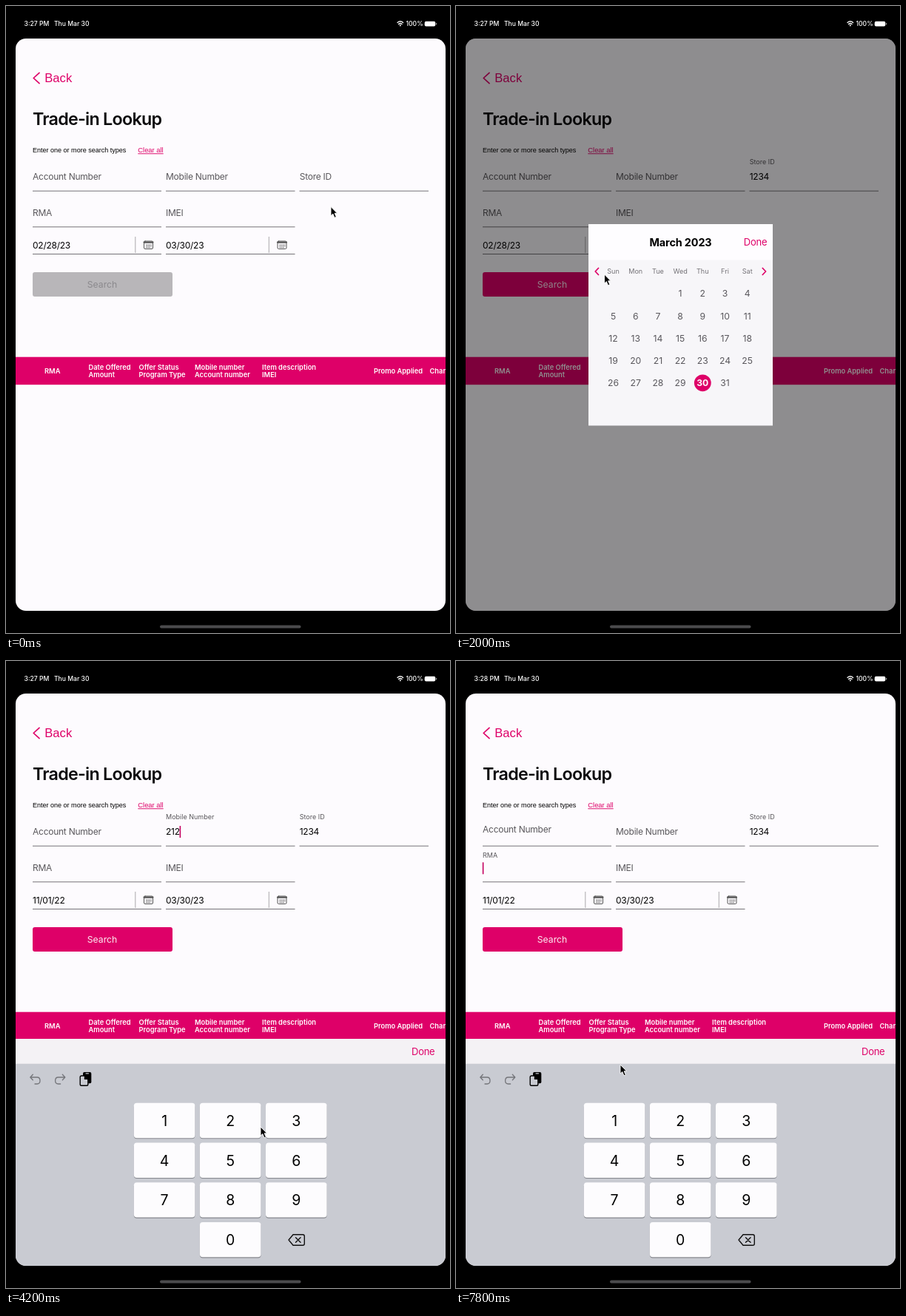
These frames come from a looping animation (600x848 px, 8000 ms). An HTML page:

```html
<!DOCTYPE html>
<html lang="en">
<head>
<meta charset="utf-8">
<title>Trade-in Lookup</title>
<style>
  html, body { margin: 0; width: 100%; height: 100%; overflow: hidden; background: #000; }
  svg { display: block; width: 100vw; height: 100vh; }
  text { font: 12px Inter, Roboto, sans-serif; font-optical-sizing: none; white-space: pre; }
  .arial { font-family: "Liberation Sans", sans-serif; }
  .mid { text-anchor: middle; }
  .pink { fill: #de0068; }
  .field { letter-spacing: -.25px; }
  .done { font-size: 13px; letter-spacing: -.25px; }
  .status text { font-size: 8.6px; font-weight: 500; fill: #fff; }
  .head text { font-size: 9.3px; font-weight: 600; fill: #fff; }
  .line { fill: none; stroke-linecap: round; stroke-linejoin: round; }
</style>
</head>
<body>
<svg viewBox="0 0 600 848" xmlns="http://www.w3.org/2000/svg">
  <defs>
    <clipPath id="panel"><rect x="13" y="44" width="581" height="774" rx="14"/></clipPath>
    <filter id="soft" x="-10%" y="-50%" width="120%" height="200%">
      <feDropShadow dx="0" dy="2" stdDeviation="5" flood-opacity=".22"/>
    </filter>
    <g id="calIcon" class="line" stroke="#555">
      <rect x="-6" y="-5" width="12" height="10.5" rx="1.5"/>
      <path d="M-6-3.4H6" stroke-width="2.2"/>
      <path d="M-3 0H4M-3 1.8H4M-3 3.6H2" stroke-width=".9" stroke-dasharray=".7 1.5"/>
    </g>
  </defs>

  <rect width="600" height="848"/>
  <g class="status">
    <text id="clock" x="24.5" y="27"></text>
    <text x="65" y="27">Thu Mar 30</text>
    <text x="540.5" y="27">100%</text>
    <g class="line" stroke="#fff" stroke-width="1.4">
      <path d="M529 22.4Q532.8 19 536.6 22.4M530.6 24.5Q532.8 22.5 535 24.5"/>
      <circle cx="532.8" cy="26.3" r=".4"/>
    </g>
    <rect x="565.7" y="20.8" width="14.6" height="6.6" rx="2" fill="#fff"/>
    <rect x="581" y="22.8" width="1.2" height="2.6" rx=".6" fill="#999"/>
  </g>
  <rect x="208" y="837.5" width="190.5" height="4" rx="2" fill="#4b4b4d"/>

  <g clip-path="url(#panel)">
    <rect x="13" y="44" width="581" height="774" fill="#fdfbfe"/>
    <path class="line" d="M45 90.3L37.2 97.5L45 104.7" stroke="#de0068" stroke-width="1.7"/>
    <text class="arial pink" x="52.3" y="103" style="font-size:16.6px">Back</text>
    <text x="36" y="161" style="font-size:23.3px;font-weight:600;letter-spacing:-.75px" fill="#0b0a0c">Trade-in Lookup</text>
    <text class="arial" x="36" y="198.3" style="font-size:9.03px">Enter one or more search types</text>
    <text class="arial pink" x="178.3" y="198.3" style="font-size:9.4px;text-decoration:underline">Clear all</text>

    <path d="M36 250.2H210M216 250.2H390.5M396.5 250.2H571M36 298.8H210M216 298.8H390.5M36 335.5H210M216 335.5H390.5" stroke="#757377"/>
    <path d="M174.8 312V334M355.3 312V334" stroke="#aaa8ac"/>
    <use href="#calIcon" x="192.5" y="323"/>
    <use href="#calIcon" x="373" y="323"/>
    <g id="fields"></g>
    <text id="from" class="field" x="36" y="327.6"></text>
    <text class="field" x="216" y="327.6">03/30/23</text>
    <rect id="caret" width="1.6" height="16" fill="#c4005f"/>

    <rect id="button" x="36" y="360" width="189" height="33" rx="3"/>
    <text id="buttonText" class="mid" x="130" y="381" style="font-size:12.2px">Search</text>

    <rect class="pink" x="13" y="474.7" width="581" height="37.5"/>
    <g class="head" id="head"></g>

    <g id="bar">
      <rect x="13" y="732.5" width="581" height="86" fill="#f3f2f5"/>
      <path d="M13 732.5H594" stroke="#cfced2"/>
      <text class="done pink" x="548" y="754">Done</text>
      <rect x="117" y="766" width="373" height="36" rx="8" fill="#f1f0f3" filter="url(#soft)"/>
      <rect x="162" y="768" width="283" height="32" rx="7" fill="#dddce0"/>
      <path d="M255.5 778V790M350.5 778V790" stroke="#a5a4a8"/>
      <text id="guess" class="mid" x="209" y="788.3" style="font-size:12.6px"></text>
      <g class="line" stroke="#333" stroke-width="1.1">
        <rect x="133.3" y="779" width="17" height="9.5" rx="1.8"/>
        <path d="M136 781.7H148M136 784H148" stroke-dasharray=".8 1.8"/>
        <path d="M138 786.3H145"/>
        <rect x="463.7" y="777" width="4.8" height="9" rx="2.4"/>
        <path d="M461.3 783.5Q461.3 788.3 466.1 788.3T470.9 783.5M466.1 788.5V791M463.7 791.2H468.5"/>
      </g>
      <circle cx="150.2" cy="786.8" r="3.7" fill="#222"/>
      <path class="line" d="M148.5 786.8H152" stroke="#fff" stroke-dasharray=".1 1.6"/>
    </g>

    <g id="pad">
      <rect x="13" y="511" width="581" height="34" fill="#f4f2f5"/>
      <text class="done pink" x="548" y="532.6">Done</text>
      <rect x="13" y="544.7" width="581" height="274" fill="#c9cbd2"/>
      <g class="line" stroke="#74757a" stroke-width="1.3">
        <path id="undo" d="M36.3 559.3L32.8 563L36.3 566.7M33 563H42Q46 563 46 567.5T42 572H39"/>
        <use href="#undo" transform="matrix(-1 0 0 1 112.6 0)"/>
      </g>
      <rect x="104" y="556" width="11.3" height="15.2" rx="2"/>
      <rect x="107.5" y="557.2" width="4.5" height="1.3" rx=".6" fill="#c9cbd2"/>
      <path d="M102 561H106.5L110.8 565.3V572.5Q110.8 574.3 109 574.3H102Q100.2 574.3 100.2 572.5V562.8Q100.2 561 102 561ZM106.5 561V565.3H110.8" fill="#c9cbd2" stroke="#000" stroke-width="1.4"/>
      <g id="keys"></g>
      <path class="line" d="M388 775.8H401Q403.3 775.8 403.3 778V788Q403.3 790.2 401 790.2H388L382 783ZM391.5 779.8L398 786.3M398 779.8L391.5 786.3" stroke="#111" stroke-width="1.4"/>
    </g>

    <g id="picker">
      <rect x="13" y="44" width="581" height="774" opacity=".44"/>
      <rect x="179" y="295" width="249" height="272.5" fill="#f7f6f9"/>
      <rect x="179" y="295" width="249" height="48.5" fill="#fefdff"/>
      <text id="month" class="mid" x="303.5" y="325" style="font-size:14.4px;font-weight:700;letter-spacing:-.12px"></text>
      <text class="done pink" x="388.8" y="324">Done</text>
      <path class="line" d="M192.5 354.5L188.2 359L192.5 363.5M414.3 354.5L418.6 359L414.3 363.5" stroke="#de0068" stroke-width="1.7"/>
      <g id="days"></g>
    </g>
  </g>
  <path id="cursor" d="M0 0V12.2L2.8 9.6L5 14.8L7.3 13.8L5.1 8.8H8.6Z" stroke="#fff" stroke-width=".9" stroke-linejoin="round"/>
</svg>

<script>
const STEP = 200, STEPS = 40;
const $ = id => document.getElementById(id);
const label = (x, y, s, attrs = '') => `<text x="${x}" y="${y}" ${attrs}>${s}</text>`;
const show = (id, on) => $(id).style.display = on ? '' : 'none';

// A track is a list of [step, value]; each value holds until the next one.
const at = (track, i) => track.reduce((v, [s, next]) => s <= i ? next : v, track[0][1]);

// Label poses: [font size, lift]
const LOW = [12, 0], HIGH = [9, -21.2], HIGH2 = [9, -18];
const fields = [
  { name: 'Account Number', x: 36, y: 235,
    pose: [[0, LOW], [32, [9, -4.4]], [33, HIGH], [38, [12, -3.5]]],
    text: [[0, ''], [34, '1'], [35, '12'], [36, '1'], [37, '']] },
  { name: 'Mobile Number', x: 216, y: 235,
    pose: [[0, LOW], [19, HIGH], [31, LOW]],
    text: [[0, ''], [20, '2'], [21, '212'], [22, '2125'], [23, '21255'], [24, '212555'],
      [25, '21255'], [26, '212'], [27, '2'], [28, '']] },
  { name: 'Store ID', x: 396.7, y: 235,
    pose: [[0, LOW], [2, HIGH]],
    text: [[0, ''], [3, '1'], [4, '12'], [5, '123'], [6, '1234']] },
  { name: 'RMA', x: 36, y: 284.3, pose: [[0, LOW], [38, HIGH2]], text: [[0, '']] },
  { name: 'IMEI', x: 216, y: 284.3,
    pose: [[0, LOW], [31, HIGH2], [32, [12, -17]], [33, LOW]], text: [[0, '']] }
];
const focus = [[0, -1], [2, 2], [8, -1], [19, 1], [31, 4], [32, 0], [38, 3]];
const monthsBack = [[0, 0], [11, 1], [12, 2], [13, 3], [14, 4]];

const path = [[0, 439, 271.5], [2, 430, 236], [5, 430, 236], [8, 181, 321.5], [9, 192, 324],
  [10, 200.5, 363], [11, 190, 359], [14, 190, 359], [15, 273, 388], [16, 404, 320],
  [17, 436.5, 347], [19, 262, 236], [20, 303, 622], [21, 344, 630], [22, 303, 676],
  [24, 303, 676], [25, 391, 783], [28, 391, 783], [30, 262, 290], [31, 250, 284],
  [32, 138, 236], [33, 132, 236], [34, 213, 622], [35, 302, 622], [36, 391, 780],
  [37, 391, 780], [38, 140, 282], [39, 222, 546]];

function cursorAt(i) {
  const n = path.findIndex(p => p[0] >= i);
  const [s1, x1, y1] = path[n], [s0, x0, y0] = path[Math.max(0, n - 1)];
  const k = s1 > s0 ? (i - s0) / (s1 - s0) : 0;
  return [x0 + (x1 - x0) * k, y0 + (y1 - y0) * k];
}

function build() {
  $('fields').innerHTML = fields.map(f =>
    label(f.x, f.y, f.name, 'class="field" fill="#59575b"') +
    label(f.x, f.y + .3, '', 'class="field"')).join('');
  fields.forEach((f, n) => [f.label, f.value] = [...$('fields').children].slice(n * 2, n * 2 + 2));

  const columns = [[111.5, 'Date Offered', 'Amount'], [179.5, 'Offer Status', 'Program Type'],
    [255, 'Mobile number', 'Account number'], [346, 'Item description', 'IMEI']];
  $('head').innerHTML = columns.map(([x, a, b]) => label(x, 491.7, a) + label(x, 502.1, b)).join('') +
    label(52, 497.2, 'RMA') + label(497, 497.2, 'Promo Applied') + label(572.5, 497.2, 'Charge');

  $('keys').innerHTML = [1, 2, 3, 4, 5, 6, 7, 8, 9, 0].map((d, n) => {
    const x = d ? 172.8 + n % 3 * 89.1 : 261.9, y = 597.8 + Math.floor(n / 3) * 53.7;
    const key = (dy, fill) => `<rect x="${x}" y="${y + dy}" width="82.6" height="47.4" rx="4" fill="${fill}"/>`;
    return key(1.1, '#85878d') + key(0, '#fdfcfe') +
      label(x + 41.3, y + 31.2, d, 'class="mid" style="font-size:19.5px"');
  }).join('');
}

function drawMonth(back, picked) {
  const first = new Date(2023, 2 - back, 1), start = first.getDay();
  const count = new Date(2023, 3 - back, 0).getDate();
  const name = first.toLocaleString('en-US', { month: 'long' });
  $('month').textContent = `${name} ${first.getFullYear()}`;
  let out = '';
  ['Sun', 'Mon', 'Tue', 'Wed', 'Thu', 'Fri', 'Sat'].forEach((d, n) =>
    out += label(212.5 + n * 30.2, 362.2, d, 'class="mid" fill="#747277" style="font-size:9.1px"'));
  for (let d = 1; d <= count; d++) {
    const cell = d + start - 1, x = 212.5 + cell % 7 * 30.2, y = 389 + Math.floor(cell / 7) * 30.2;
    const on = d === picked;
    if (on) out += `<circle class="pink" cx="${x}" cy="${y}" r="11.4"/>`;
    out += label(x, y + 4.4, d, `class="mid" fill="${on ? '#fff' : '#59575c'}" style="font-size:12.2px;font-weight:${on ? 700 : 400}"`);
  }
  $('days').innerHTML = out;
}

function render(i) {
  $('clock').textContent = i < 35 ? '3:27 PM' : '3:28 PM';
  for (const f of fields) {
    const [size, lift] = at(f.pose, i);
    f.label.style.fontSize = size + 'px';
    f.label.style.letterSpacing = size < 12 ? 0 : '';
    f.label.setAttribute('y', f.y + lift);
    f.value.textContent = at(f.text, i);
  }
  const active = fields[at(focus, i)];
  show('caret', active);
  if (active) {
    const width = active.value.textContent ? active.value.getComputedTextLength() : 0;
    $('caret').setAttribute('x', active.x + width - .2);
    $('caret').setAttribute('y', active.y - 12);
  }
  const typed = at(fields[2].text, i);
  $('from').textContent = i < 17 ? '02/28/23' : '11/01/22';
  $('button').setAttribute('fill', typed ? '#de0068' : '#b8b6b9');
  $('buttonText').setAttribute('fill', typed ? '#fdeaf3' : '#8b898d');

  show('bar', i >= 2 && i < 9);
  $('guess').textContent = typed && `“${typed}”`;
  show('pad', i >= 19);
  const open = i >= 10 && i < 17;
  show('picker', open);
  if (open) {
    const back = at(monthsBack, i);
    drawMonth(back, back === 0 ? 30 : i >= 15 ? 1 : 0);
  }
  $('cursor').setAttribute('transform', `translate(${cursorAt(i)})`);
}

build();
const began = performance.now();
let last = -1;
function tick() {
  const i = Math.floor((performance.now() - began) / STEP) % STEPS;
  if (i !== last) render(last = i);
  requestAnimationFrame(tick);
}
tick();
</script>
</body>
</html>
```
